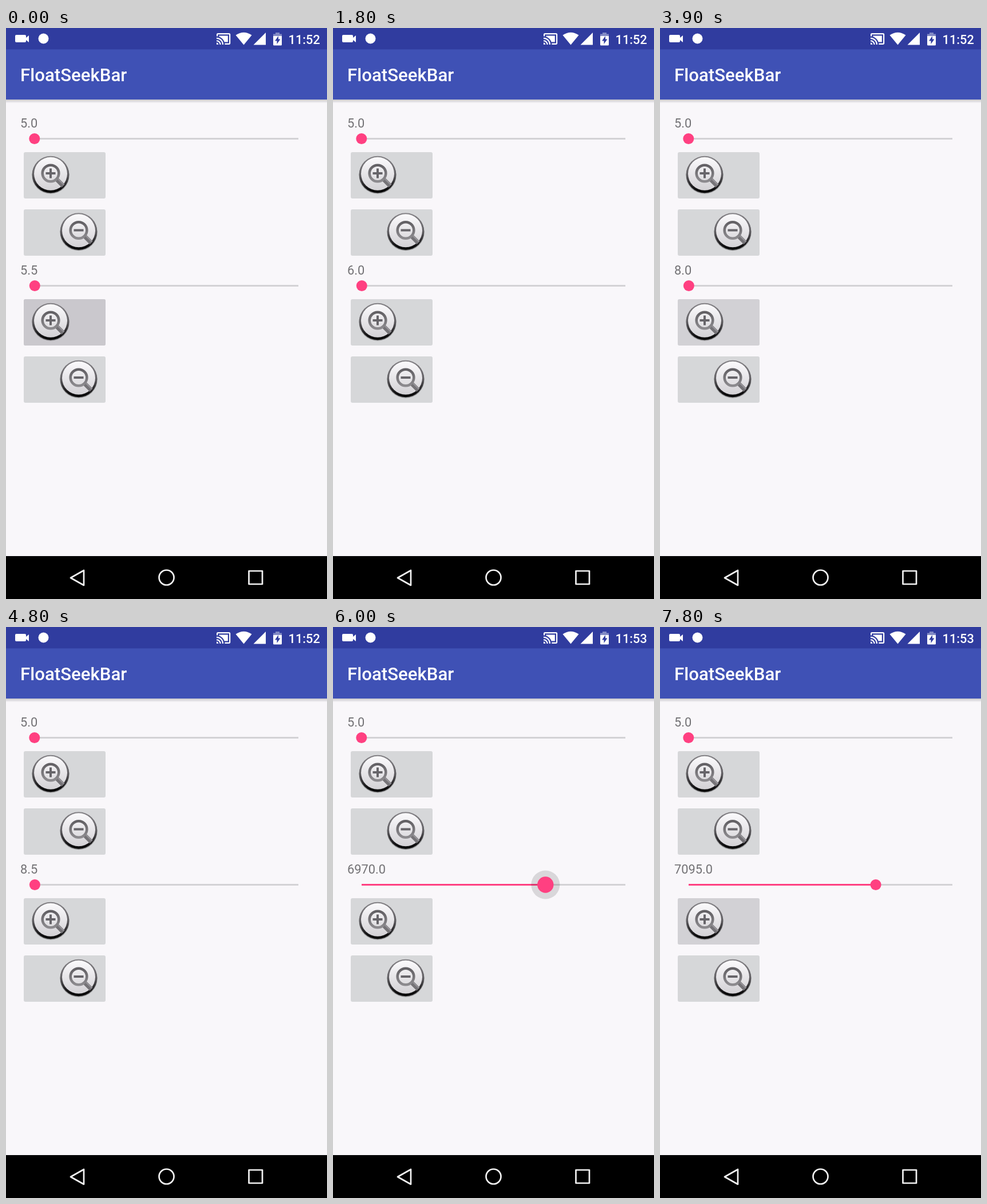
Recreate the animation shown at these times as an HTML page. Size 561 by 998 pixels, loop 8000 ms.

```html
<!DOCTYPE html>
<html lang="en">
<head>
<meta charset="utf-8">
<title>FloatSeekBar</title>
<style>
  html, body { margin: 0; width: 100%; height: 100%; overflow: hidden; background: #f9f7fa; }
  svg { display: block; width: 561px; height: 998px; font-family: Roboto, sans-serif; }
  .label { font-size: 21.8px; fill: #727174; }
  .pink { fill: #ff4081; }
  .track { fill: #d3d2d5; }
  .button { fill: #d6d7d9; }
</style>
</head>
<body>
<svg viewBox="0 0 561 998">
  <defs>
    <linearGradient id="rim" x2="0" y2="1">
      <stop offset="0" stop-color="#858387"/>
      <stop offset=".5" stop-color="#615f63"/>
      <stop offset=".85" stop-color="#171618"/>
      <stop offset="1" stop-color="#000"/>
    </linearGradient>
    <linearGradient id="face" x2="0" y2="1">
      <stop offset="0" stop-color="#fbfafc"/>
      <stop offset="1" stop-color="#d3d1d5"/>
    </linearGradient>
    <linearGradient id="shade" x2="0" y2="1">
      <stop offset="0" stop-color="#000" stop-opacity=".2"/>
      <stop offset="1" stop-color="#000" stop-opacity="0"/>
    </linearGradient>
    <linearGradient id="lens" x2="0" y2="1">
      <stop offset="0" stop-color="#626064"/>
      <stop offset="1" stop-color="#8d8b8f"/>
    </linearGradient>
    <g id="disc">
      <circle cy="1.2" r="32.6" fill="#000" opacity=".35"/>
      <circle r="32.3" fill="url(#rim)"/>
    </g>
    <g id="glass" fill="none">
      <path d="M10 8L22 20" stroke="#757377" stroke-width="7.5"/>
      <path d="M13 8L23 18" stroke="#97959a" stroke-width="2"/>
      <circle cy="-2" r="14.3" stroke="url(#lens)" stroke-width="4.6"/>
      <path d="M-8.5-2h17" stroke="#67656a" stroke-width="4"/>
    </g>
    <path id="bar" d="M0-8.5v17" stroke="#67656a" stroke-width="4"/>
    <g id="minus">
      <use href="#disc"/><circle cy="-1.2" r="29" fill="url(#face)"/><use href="#glass"/>
    </g>
    <g id="plus"><use href="#minus"/><use href="#bar" y="-2"/></g>
    <rect id="box" x="31" width="143" height="81" rx="3"/>
  </defs>

  <rect width="561" height="998" fill="#f9f7fa"/>
  <rect y="124.6" width="561" height="7" fill="url(#shade)"/>
  <rect width="561" height="125" fill="#3f51b5"/>
  <rect width="561" height="37.4" fill="#303c9f"/>
  <text x="25" y="93" font-size="31.2" font-weight="500" fill="#fff">FloatSeekBar</text>

  <g fill="#fff">
    <path d="M18 12h15q2 0 2 2v3l5-4v12l-5-4v2q0 2-2 2H18q-2 0-2-2v-9q0-2 2-2z"/>
    <circle cx="65.5" cy="18.5" r="9"/>
    <path transform="translate(366.9 5.8) scale(1.1)" d="M21 3H3c-1.1 0-2 .9-2 2v3h2V5h18v14h-7v2h7c1.1 0 2-.9 2-2V5c0-1.1-.9-2-2-2zM1 18v3h3c0-1.66-1.34-3-3-3zm0-4v2c2.76 0 5 2.24 5 5h2c0-3.87-3.13-7-7-7zm0-4v2c4.97 0 9 4.03 9 9h2c0-6.08-4.93-11-11-11zM19 7H5v1.63c3.96 1.28 7.09 4.41 8.37 8.37H19V7z"/>
    <path d="M415.5 29.5L401.5 12.5q14-9.5 28 0z"/>
    <path d="M432.5 29.5h21.5V8z"/>
    <path d="M467 14h15v-3.4h-4V8h-7v2.6h-4z" opacity=".4"/>
    <path fill-rule="evenodd" d="M467 14h15v15q0 1.500-1.500 1.500h-12q-1.500 0-1.500-1.500zM476 14l-6 8.500h3.500v5.500l6-8.500H476z"/>
    <text id="clock" x="493.500" y="27.500" font-size="21.8" font-weight="500"></text>
  </g>

  <text class="label" x="25" y="173.500">5.0</text>
  <rect class="track" x="50" y="192" width="461" height="3"/>
  <circle class="pink" cx="49.800" cy="193.500" r="9.500"/>
  <use class="button" href="#box" y="217"/><use href="#plus" x="78" y="256"/>
  <use class="button" href="#box" y="317"/><use href="#minus" x="127" y="355.500"/>

  <text class="label" id="value" x="25" y="431"></text>
  <rect class="track" x="50" y="449" width="461" height="3"/>
  <rect class="pink" id="fill" x="50" y="449" height="3"/>
  <circle id="halo" cy="450.500" r="25"/>
  <circle class="pink" id="thumb" cy="450.500"/>
  <use class="button" href="#box" y="474"/>
  <use id="ripple" href="#box" y="474" fill="#cac8cd"/>
  <use href="#plus" x="78" y="513"/>
  <g id="pressed" transform="translate(78 513)">
    <circle cy="-1.200" r="29" fill="#feb414"/><use href="#glass"/><use href="#bar" y="-2"/>
  </g>
  <use class="button" href="#box" y="574"/><use href="#minus" x="127" y="613"/>

  <rect y="923" width="561" height="75"/>
  <g fill="none" stroke="#f2f2f2" stroke-width="2.700" stroke-linejoin="round">
    <path d="M113 961l23-13v26z"/>
    <circle cx="280.500" cy="960.500" r="13"/>
    <rect x="424.500" y="949" width="23.500" height="23"/>
  </g>
</svg>
<script>
const $ = id => document.getElementById(id);
const set = (id, attrs) => { for (const k in attrs) $(id).setAttribute(k, attrs[k]); };
const clamp = x => Math.max(0, Math.min(1, x));

const LOOP = 8000, TICK = 100, GRAB = 5400, DROP = 6300;
const taps = [-100, 1300, 1900, 2400, 2900, 3500, 4100, 7000, 7400];
const drag = [[5400, 1730], [5500, 2184], [5600, 3120], [5800, 5640], [5900, 6510],
              [6000, 6970], [6100, 7060], [6200, 7094]];

function dragged(t) {
  const i = drag.findIndex(p => p[0] > t);
  if (i < 0) return 7094;
  const [t0, v0] = drag[i - 1], [t1, v1] = drag[i];
  return Math.round(v0 + (v1 - v0) * (t - t0) / (t1 - t0));
}

// Each completed tap on the plus button adds one half.
function valueAt(t) {
  const steps = from => taps.filter(p => p >= from && t >= p + 100).length / 2;
  return t < GRAB ? 5 + steps(-100) : dragged(t) + steps(GRAB);
}

function draw(t) {
  const value = valueAt(t), x = 50 + 461 * value / 10000;
  $('value').textContent = value.toFixed(1);
  $('clock').textContent = t < 5800 ? '11:52' : '11:53';

  const hold = t < GRAB ? 0 : clamp((t - GRAB + 30) / 170) * clamp((DROP + 200 - t) / 200);
  set('fill', { width: x - 50 });
  set('thumb', { cx: x, r: 9.5 + 4.7 * hold });
  set('halo', { cx: x, opacity: .13 * hold ** 4 });

  const age = t - taps.filter(p => p <= t).pop();
  set('pressed', { opacity: age < 100 ? 1 : 0 });
  set('ripple', { opacity: age < 100 ? 0 : clamp((550 - age) / 400) * (age < 500) });
}

const start = performance.now();
(function frame() {
  const t = (performance.now() - start) % LOOP;
  draw(Math.floor(t / TICK) * TICK);
  requestAnimationFrame(frame);
})();
</script>
</body>
</html>
```
